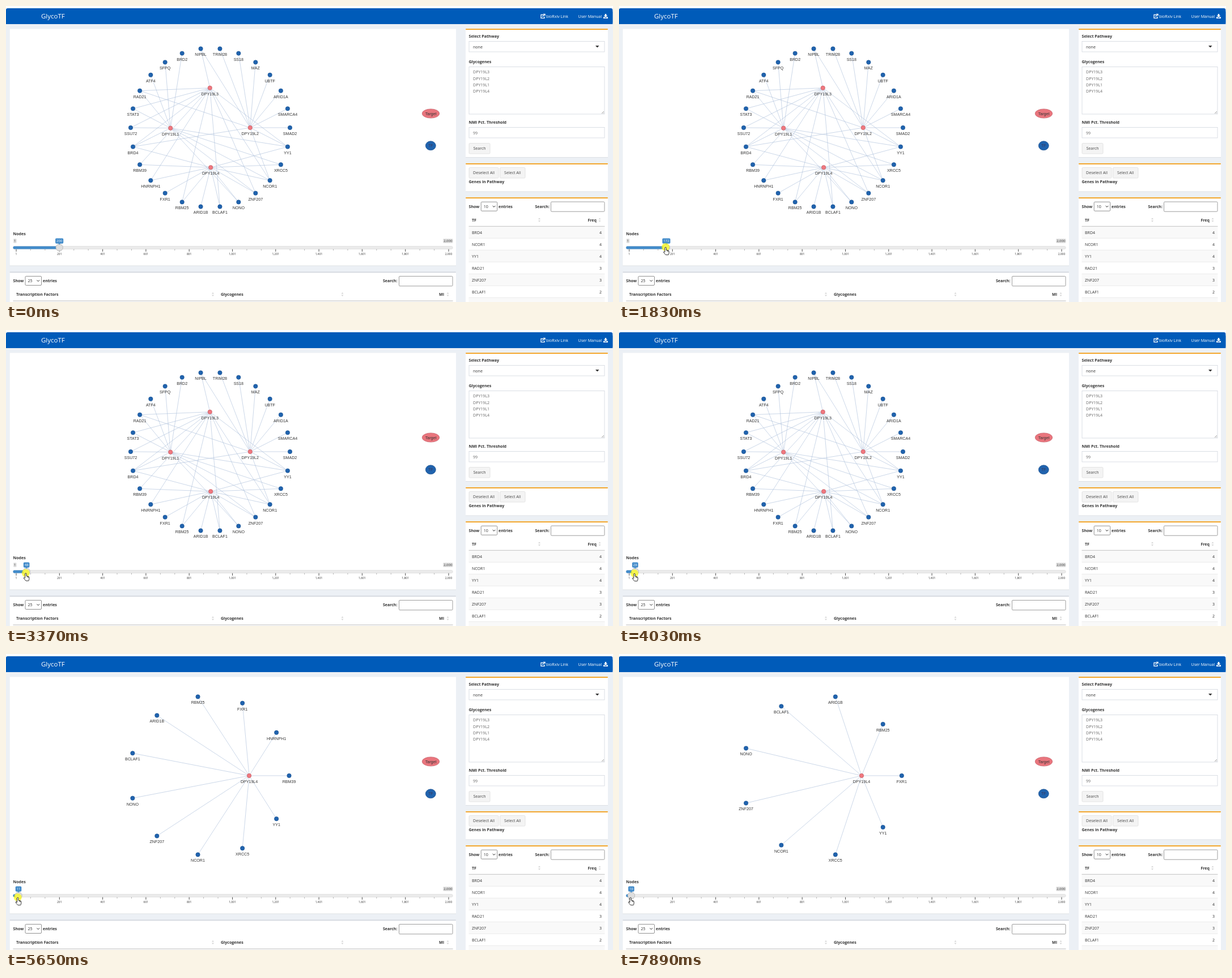
An HTML page for the animation above (8 s loop, 1071 px wide and 523 px high).

```html
<!DOCTYPE html>
<html lang="en">
<head>
<meta charset="utf-8">
<title>GlycoTF</title>
<style>
html, body { margin: 0; width: 100%; height: 100%; overflow: hidden; background: #ecf0f5; }
svg { display: block; width: 1071px; height: 523px; font: 7.05px "Open Sans", sans-serif; fill: #333; }
.b { font-weight: 700; }
.net { font: 7.1px "Liberation Sans", Arial, sans-serif; text-anchor: middle; fill: #343434; }
.small { font-size: 6px; text-anchor: middle; }
</style>
</head>
<body>
<svg id="stage" viewBox="0 0 1071 523" xmlns="http://www.w3.org/2000/svg"></svg>
<script>
const stage = document.getElementById("stage");
const attrs = o => Object.entries(o).map(([k, v]) => ` ${k}="${v}"`).join("");
const rect = (x, y, x2, y2, fill, more = {}) =>
  `<rect${attrs({ x, y, width: x2 - x, height: y2 - y, fill, ...more })}/>`;
const text = (x, y, s, more = {}) => `<text${attrs({ x, y, ...more })}>${s}</text>`;
const bold = (x, y, s, more) => text(x, y, s, { class: "b", ...more });
const line = (x1, y1, x2, y2, stroke, w = 0.6) =>
  `<line${attrs({ x1, y1, x2, y2, stroke, "stroke-width": w })}/>`;
const field = (x, y, x2, y2, stroke = "#d2d6de", fill = "#fff", rx = 0) =>
  rect(x + .5, y + .5, x2 - .5, y2 - .5, fill, { stroke, "stroke-width": .8, rx });
const panel = (x, y, x2, y2, top) =>
  rect(x, y, x2, y2 + .8, "#d9dde2") + rect(x, y, x2, y2, "#fff") +
  (top ? rect(x, y, x2, y + 1.8, top, { rx: .8 }) : "");
const button = (x, y, x2, y2, s) => field(x, y, x2, y2, "#ddd", "#f4f4f4", 1.5) +
  text((x + x2) / 2, (y + y2) / 2 + 2.6, s, { "text-anchor": "middle", fill: "#444" });
const sorter = (x, y) => `<path d="M${x - 2} ${y - 1}l2-2.6 2 2.6zm0 2l2 2.6 2-2.6z" fill="#d3d3d3"/>`;
const picker = (x, y, n) => field(x, y, x + 29.5, y + 17, "#767676", "#fff", 1.5) + text(x + 5, y + 11, n) +
  `<path d="M${x + 21} ${y + 7.3}l2.3 2.3 2.3-2.3" fill="none" stroke="#222"/>`;

function header() {
  return rect(0, 0, 1071, 8, "#fff") + rect(0, 4, 1070.3, 32, "#005bb9", { rx: 3 }) + rect(0, 10, 1070.3, 32, "#005bb9") +
    `<g fill="#fff">${text(62, 21.8, "GlycoTF", { "font-size": 11.5 })}
    ${text(953, 20.7, "bioRxiv Link")}${text(1009.5, 20.7, "User Manual")}
    <path d="M948 15.3h-4v6h6v-2.5M946.5 18.8l4-4M948 14.3h3v3" fill="none" stroke="#fff" stroke-width="1.3"/>
    <path d="M1056.7 14h2.6v2.8h2l-3.3 3.4-3.3-3.4h2zM1054 19.4h1.8l2.2 1.8 2.2-1.8h1.8v2.6h-8z"/></g>`;
}

function sidebar() {
  const orange = "#f39c12";
  let s = panel(811, 40.3, 1062, 267, orange) + panel(811, 278, 1062, 327.5, orange) + panel(811, 338.3, 1062, 530, orange);
  s += bold(816.5, 56.4, "Select Pathway") + field(816.5, 62, 1056.5, 81.5) + text(824, 74.5, "none") +
    `<path d="M1040 70h6.6l-3.3 3.6z"/>` +
    bold(816.5, 101, "Glycogenes") + field(816.5, 107, 1056.5, 191.5);
  [3, 2, 1, 4].forEach((n, i) => s += text(824, 119.2 + i * 11.3, "DPY19L" + n, { fill: "#666" }));
  s += `<path d="M1051 190l4-4M1053.5 190l1.5-1.5" stroke="#777" stroke-width=".7"/>` +
    bold(816.5, 208.2, "NMI Pct. Threshold") + field(816.5, 214, 1056.5, 233.5) + text(824, 226.6, "99", { fill: "#666" }) +
    button(816.5, 242, 854.5, 261.5, "Search") + button(816.5, 285, 869.5, 304.5, "Deselect All") +
    button(871, 285, 916.5, 304.5, "Select All") + bold(816.5, 313, "Genes in Pathway") +
    bold(816.5, 357, "Show") + picker(837.7, 345.7, 10) + bold(869, 357, "entries") +
    bold(959, 357, "Search:", { "text-anchor": "end" }) + field(961, 345.5, 1056.5, 363.7, "#858585", "#fff", 1.5) +
    bold(822, 380.7, "TF") + bold(1042, 380.7, "Freq", { "text-anchor": "end" }) + sorter(941, 378) + sorter(1047.5, 378);
  const rows = [["BRD4", 4], ["NCOR1", 4], ["YY1", 4], ["RAD21", 3], ["ZNF207", 3], ["BCLAF1", 2], ["", ""]];
  rows.forEach(([name, freq], i) => {
    const y = 389.3 + i * 21;
    if (i % 2 === 0) s += rect(816.5, y, 1056.5, y + 21, "#f9f9f9");
    s += line(816.5, y, 1056.5, y, i ? "#e4e4e4" : "#aaa", .7) + text(822, y + 13.2, name) +
      text(1051, y + 13.2, freq, { "text-anchor": "end" });
  });
  return s;
}

function mainPanels() {
  let s = panel(6.5, 40.3, 794, 458.5) + panel(6.5, 469.5, 794, 530, "#d2d6de");
  s += bold(12.5, 488.3, "Show") + picker(33.5, 477, 25) + bold(65, 488.3, "entries") +
    bold(690.5, 488.3, "Search:", { "text-anchor": "end" }) + field(693, 477, 788.5, 495.3, "#858585", "#fff", 1.5) +
    bold(18, 512, "Transcription Factors") + bold(379, 512, "Glycogenes") +
    bold(773, 512, "MI", { "text-anchor": "end" }) + sorter(365, 509.5) + sorter(593.5, 509.5) + sorter(779.5, 509.5) +
    line(12.5, 521, 788.5, 521, "#aaa", .8);
  s += `<g class="net" font-size="7.3"><ellipse cx="749.5" cy="190" rx="15.3" ry="8.1" fill="#e9757d" stroke="#c5606a" stroke-width=".7"/>
    ${text(749.5, 192.5, "Target")}
    <ellipse cx="749.3" cy="246.8" rx="9" ry="8" fill="#2063ae" stroke="#174c8a" stroke-width=".7"/>
    ${text(749.3, 249.4, "TF", { fill: "#3a3a5c" })}</g>`;
  s += bold(12.5, 404.7, "Nodes") + field(12.3, 424, 788.7, 430, "#ddd", "#ebebeb", 2.5) +
    `<g class="small">` + rect(771, 411, 788.7, 419, "#e1e1e1", { rx: 2 }) + text(779.8, 417.2, "2,000");
  for (let i = 0; i <= 30; i++) {
    const x = 18 + i * 76.3 / 3, major = i % 3 === 0;
    s += line(x, 429.7, x, major ? 434 : 432, major ? "#222" : "#999", .8);
    if (major) s += text(x, 440.3, i === 30 ? "2,000" : (1 + i / 3 * 200).toLocaleString("en-US"), { style: "font-size:5px" });
  }
  return s + "</g>";
}

// Network: every target links to 12 factors; a smaller count keeps the tail of the list.
const factors = ("SMAD2 SMARCA4 ARID1A UBTF MAZ SS18 TRIM28 NIPBL BRD2 SFPQ ATF4 RAD21 STAT3 SSU72 BRD4 RBM39 " +
  "HNRNPH1 FXR1 RBM25 ARID1B BCLAF1 NONO ZNF207 NCOR1 XRCC5 YY1").split(" ");
const links = Object.entries({
  DPY19L2: "SMAD2 SMARCA4 ARID1A UBTF MAZ SS18 TRIM28 NIPBL RAD21 BRD4 NCOR1 YY1",
  DPY19L3: "NIPBL RAD21 STAT3 SSU72 BRD4 RBM39 HNRNPH1 RBM25 BCLAF1 ZNF207 NCOR1 YY1",
  DPY19L1: "BRD2 SFPQ ATF4 RAD21 STAT3 SSU72 BRD4 NONO ZNF207 NCOR1 XRCC5 YY1",
  DPY19L4: "BRD4 RBM39 HNRNPH1 FXR1 RBM25 ARID1B BCLAF1 NONO ZNF207 NCOR1 XRCC5 YY1"
}).flatMap(([target, list]) => list.split(" ").map(tf => [target, tf]));

function network(count, cx) {
  const shown = links.slice(-count), cy = 215;
  const tfs = factors.filter(f => shown.some(l => l[1] === f));
  const targets = [...new Set(shown.map(l => l[0]))];
  const angle = (i, n) => i * 2 * Math.PI / n;
  const r = 139.5 / Math.max(...tfs.map((_, i) => Math.sin(angle(i, tfs.length))));
  const pos = {};
  const place = (names, radius, tilt) => names.forEach((name, i) => {
    const a = angle(i, names.length) + (i && tilt);
    pos[name] = [cx + radius * Math.cos(a), cy - radius * Math.sin(a)];
  });
  place(tfs, r, 0);
  place(targets, r / 2, .01);
  const node = (name, fill, stroke) => {
    const [x, y] = pos[name];
    return `<circle cx="${x}" cy="${y}" r="3.7" fill="${fill}" stroke="${stroke}" stroke-width=".6"/>` + text(x, y + 12.9, name);
  };
  return shown.map(([a, b]) => line(...pos[a], ...pos[b], "#a8bdd8", .6)).join("") +
    tfs.map(n => node(n, "#2063ae", "#164d8c")).join("") +
    targets.map(n => node(n, "#f0787f", "#b9555d")).join("");
}

// [start time, link count, centre x]
const phases = [[0, 200, 360.5], [4480, 21, 360], [5050, 16, 362.4], [5650, 11, 358.6], [6110, 8, 361], [7840, 9, 357.2]];

stage.innerHTML = rect(0, 0, 1071, 523, "#ecf0f5") + header() + mainPanels() + sidebar() +
  phases.map(([, n, cx]) => `<g class="net phase">${network(n, cx)}</g>`).join("") +
  `<g id="min" class="small">${rect(12.8, 411, 18.8, 419, "#e1e1e1", { rx: 2 })}${text(15.8, 417.2, 1)}</g>
  <rect id="bar" x="12.5" y="424.6" height="4.8" rx="2" fill="#428bca"/>
  <g id="handle"><circle cy="426.8" r="6.2" fill="#dedede" stroke="#ababab" stroke-width=".7"/>
    <rect id="tag" y="410.4" height="9.4" rx="1.7" fill="#428bca"/><path d="M-2 419.6h4l-2 2.2z" fill="#428bca"/>
    <text id="value" class="small" x="0" y="417.3" style="fill:#fff"></text></g>
  <g id="cursor" stroke="#000" stroke-width=".8" stroke-linejoin="round" fill="#fff">
    <circle id="press" r="7" fill="#ff0" fill-opacity=".65" stroke="none"/>
    <path id="arrow" d="M0 0v12l2.8-2.6 1.9 4.2 1.9-.8-1.9-4.1h3.8z"/>
    <path id="hand" d="M-1.2 8V1.4Q-1.2.3 0 .3T1.2 1.4V5.2L4.7 6Q6 6.4 6 7.8V10Q6 12 5 13.7H.2L-3.6 9.2Q-4 7.2-1.2 8.8zM2.9 5.8v2M4.7 6.2v1.8"/></g>`;

const $ = id => document.getElementById(id);
const groups = [...document.querySelectorAll(".phase")];
const show = (el, on) => el.setAttribute("visibility", on ? "visible" : "hidden");

function track(keys, t) {
  const i = keys.findIndex(k => k[0] > t);
  if (i < 0) return keys[keys.length - 1][1];
  if (i === 0) return keys[0][1];
  const [t0, a] = keys[i - 1], [t1, b] = keys[i];
  return a + (b - a) * (t - t0) / (t1 - t0);
}
const drag = [[1690, 200], [1830, 172], [2500, 88], [2800, 77], [3320, 50], [4030, 28], [4080, 28], [4130, 25],
  [4180, 21], [4440, 21], [4780, 16], [5010, 16], [5350, 11], [5809, 11], [5810, 8], [7569, 8], [7570, 9], [7889, 9], [7890, 10]];
const tipY = [[1690, 425], [1830, 426], [2800, 429], [4030, 430]];

function pointer(t, handleX) {
  if (t < 900) {
    const u = Math.min(1, Math.max(0, (t - 60) / 810)), p = u * u * (3 - 2 * u), q = 1 - p;
    return [q * q * 1040 + 2 * q * p * 570 + p * p * 98, q * q * 490 + 2 * q * p * 205 + p * p * 411];
  }
  if (t < 1690) return [track([[900, 98], [1170, 93]], t), track([[900, 411], [1170, 425]], t)];
  return [handleX - 1.3, track(tipY, t)];
}

function draw() {
  const t = performance.now() % 8000;
  const phase = phases.filter(p => p[0] <= t).length - 1;
  groups.forEach((g, i) => show(g, i === phase));

  const v = Math.round(track(drag, t)), x = 18.2 + (v - 1) * 763 / 1999;
  const w = 3.6 + String(v).length * 3.5;
  $("bar").setAttribute("width", x - 12.5);
  $("handle").setAttribute("transform", `translate(${x} 0)`);
  $("tag").setAttribute("x", -w / 2);
  $("tag").setAttribute("width", w);
  $("value").textContent = v;
  show($("min"), x > 30);

  show($("cursor"), t >= 90);
  $("cursor").setAttribute("transform", `translate(${pointer(t, x)})`);
  $("press").setAttribute("opacity", t >= 1530 && t < 6610 ? 1 : 0);
  $("arrow").setAttribute("opacity", t < 970 ? 1 : 0);
  $("hand").setAttribute("opacity", t < 970 ? 0 : 1);
  requestAnimationFrame(draw);
}
draw();
</script>
</body>
</html>
```
